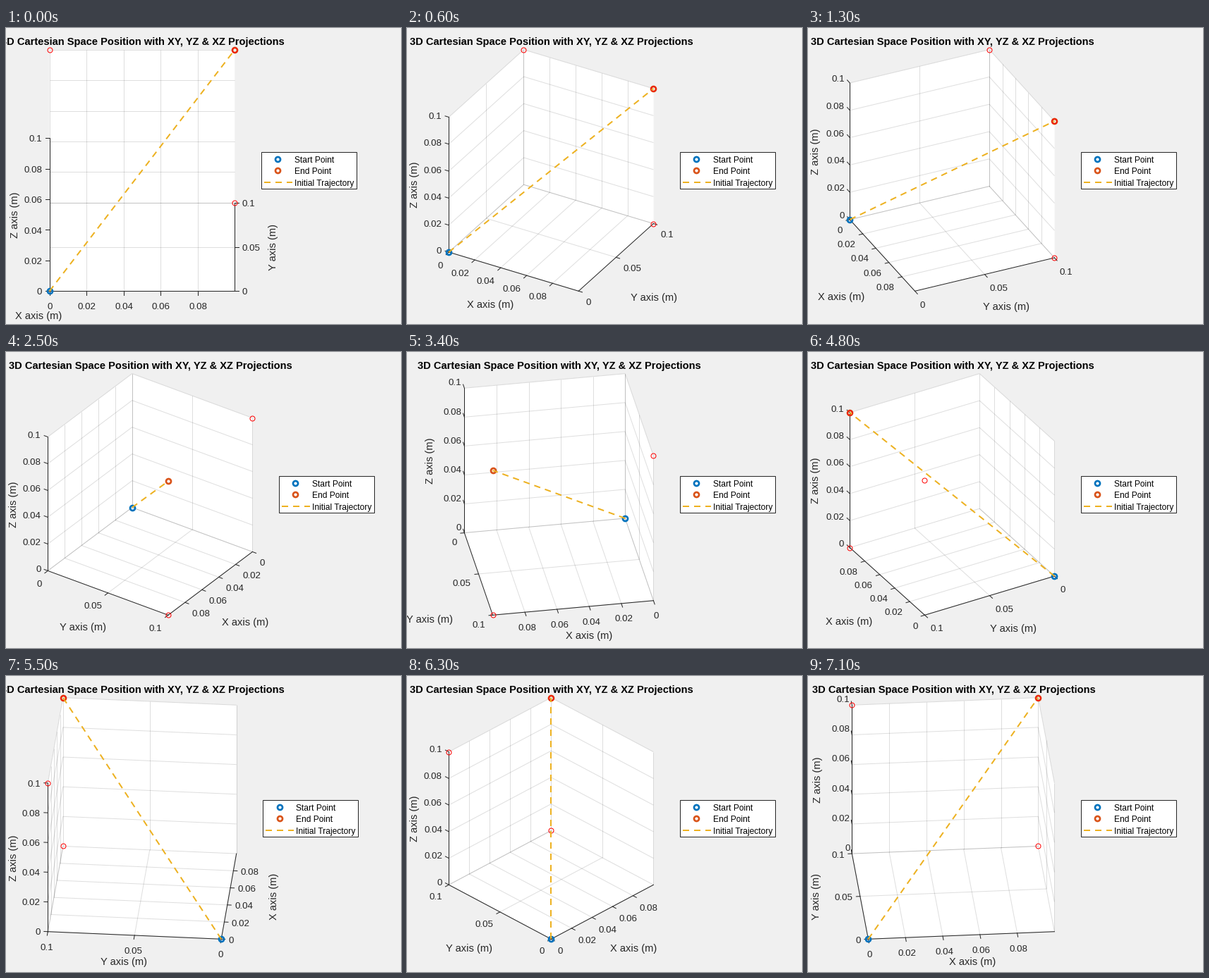
Recreate the animation shown at these times as a matplotlib script. Size 560 by 420 pixels, loop 7.2 s.

```python
import numpy as np
import matplotlib.pyplot as plt
from matplotlib.animation import FuncAnimation
from matplotlib.collections import LineCollection, PolyCollection

plt.rcParams["font.family"] = "Liberation Sans"

W, H, DPI = 560, 420, 100
PX = 72 / DPI                      # points per pixel
FRAMES, STEP, INTERVAL = 72, 5, 100
ELEV = np.radians(30)
TOP, BOTTOM, LEFT, RIGHT = 30.7, 373.3, 59.3, 349.4
ALIGNED_LEFT = 61.7
SAFE_LEFT, SAFE_RIGHT = 4, 385     # axis labels push the box inside these

INK = "#262626"
BLUE, ORANGE, YELLOW = "#0072bd", "#d95319", "#edb120"
DASH = (0, (4.5, 3.5))
X_TICKS = np.arange(5) / 5
Y_TICKS = np.array([0, 0.5, 1])
Z_TICKS = np.arange(6) / 5

# axis label offset against the tilt of its tick direction
TILT = [0, 10.7, 18.7, 42, 53, 62, 70, 76.6, 85]
TILT_DX = [10, 15.5, 23, 30, 36, 44, 50, 58, 70]
TILT_DY = [35, 36.5, 38, 44, 47, 50, 54, 58, 63]

fig = plt.figure(figsize=(W / DPI, H / DPI), dpi=DPI, facecolor="#f0f0f0")
ax = fig.add_axes([0, 0, 1, 1])


class View:
    """Unit cube seen from one azimuth, stretched to fill the plot box."""

    def __init__(self, deg, left, right):
        self.left, self.right = left, right
        self.deg = deg
        self.aligned = deg % 90 == 0
        a = np.radians(deg)
        c, s = np.cos(a), np.sin(a)
        self.mat = np.array([[c, s, 0],
                             [-np.sin(ELEV) * s, np.sin(ELEV) * c, np.cos(ELEV)]])
        self.low = np.minimum(self.mat, 0).sum(axis=1)
        self.span = np.abs(self.mat).sum(axis=1)
        self.depth = s - c
        # a tiny nudge settles which side faces the viewer when aligned
        n = a + 1e-4
        cpos, spos = np.cos(n) > 0, np.sin(n) > 0
        self.back = np.array([0 if spos else 1, 1 if cpos else 0])
        self.front = 1 - self.back
        self.corner = np.array([0 if cpos else 1, 0 if spos else 1])
        self.flat_x, self.flat_y = abs(s) < 1e-6, abs(c) < 1e-6

    def at(self, *p):
        u, v = (self.mat @ np.array(p, float) - self.low) / self.span
        return np.array([self.left + u * (self.right - self.left),
                         BOTTOM - v * (BOTTOM - TOP)])

    def direction(self, axis, sign):
        p = np.zeros(3)
        p[axis] = sign
        d = self.at(*p) - self.at(0, 0, 0)
        return d / np.hypot(*d)

    def x_axis(self, t):
        return self.at(t, self.front[1], 0)

    def y_axis(self, t):
        return self.at(self.front[0], t, 0)

    def z_axis(self, t):
        return self.at(*self.corner, t)

    def x_out(self):
        return self.direction(1, 2 * self.front[1] - 1)

    def y_out(self):
        return self.direction(0, 2 * self.front[0] - 1)

    def z_out(self):
        k = 0 if self.corner[0] == self.back[0] else 1
        return self.direction(k, 2 * self.corner[k] - 1)


def label_place(view, axis, out):
    """Centre of an axis label and whether it stands upright."""
    mid = axis(0.5)
    side = 1 if out[0] > 0 else -1
    tilt = np.degrees(np.arctan2(abs(out[0]), out[1]))
    if tilt > 86:
        return mid + [side * (53.6 if view.aligned else 63), 0], True
    if view.aligned:
        return np.array([view.left - 15.7, 408]), False
    return mid + [side * np.interp(tilt, TILT, TILT_DX),
                  np.interp(tilt, TILT, TILT_DY) + 0.6], False


def fit_view(deg):
    """Shrink the plot box where an axis label would stick out."""
    view = View(deg, LEFT, RIGHT)
    left, right = LEFT, RIGHT
    for axis, out in ((view.x_axis, view.x_out()), (view.y_axis, view.y_out())):
        (cx, _), upright = label_place(view, axis, out)
        half, gain = (7, 1) if upright else (33, 0.85)
        over_left = SAFE_LEFT - (cx - half)
        over_right = cx + half - SAFE_RIGHT
        if over_left > 2 and not view.aligned:
            left += gain * over_left
        if over_right > 2:
            right -= gain * over_right
    if view.aligned:
        left = ALIGNED_LEFT
    return View(deg, left, right)


def text(x, y, s, px, ha="center", color=INK, upright=False, **kw):
    """Text whose capitals are centred on the given point."""
    drop = 0.36 * px
    if upright:
        x += drop
    else:
        y += drop
    ax.text(x, y, s, fontsize=px * PX, ha=ha, va="baseline", color=color,
            rotation=90 if upright else 0, rotation_mode="anchor", **kw)


def line(p, q, color=INK, width=1, **kw):
    ax.plot([p[0], q[0]], [p[1], q[1]], color=color, lw=width * PX, **kw)


def dashed(p, q, z=5):
    line(p, q, YELLOW, 2, linestyle=DASH, zorder=z)


def ring(p, color, width=2.7, size=7, z=4):
    ax.plot(*p, "o", ms=size * PX, mew=width * PX, mec=color, mfc="none", zorder=z)


def draw_walls(v):
    bx, by = v.back
    square = [(0, 0), (1, 0), (1, 1), (0, 1)]
    quads = [[v.at(bx, a, b) for a, b in square],
             [v.at(a, by, b) for a, b in square],
             [v.at(a, b, 0) for a, b in square]]
    ax.add_collection(PolyCollection(quads, facecolors="white", edgecolors="white",
                                     linewidths=0.3, zorder=1))
    grid = [(v.at(t, 0, 0), v.at(t, 1, 0)) for t in X_TICKS]
    grid += [(v.at(0, t, 0), v.at(1, t, 0)) for t in Y_TICKS]
    if not v.flat_x:
        grid += [(v.at(bx, t, 0), v.at(bx, t, 1)) for t in Y_TICKS]
        grid += [(v.at(bx, 0, t), v.at(bx, 1, t)) for t in Z_TICKS]
    if not v.flat_y:
        grid += [(v.at(t, by, 0), v.at(t, by, 1)) for t in X_TICKS]
        grid += [(v.at(0, by, t), v.at(1, by, t)) for t in Z_TICKS]
    ax.add_collection(LineCollection(grid, colors=INK, alpha=0.15,
                                     linewidths=PX, zorder=2))


def draw_axis(axis, out, ticks, vertical=False):
    line(axis(0), axis(1), zorder=3)
    for t in ticks:
        p = axis(t)
        line(p, p + 5.5 * out, zorder=3)
        x, y = p + 9.5 * out
        if vertical:
            ha = "right"
        else:
            if abs(out[1]) > 0.06:
                y += 11.4
            ha = "center" if abs(out[0]) < 0.4 else "left" if out[0] > 0 else "right"
        x += {"left": 1, "right": -1, "center": 0.4}[ha]
        text(x, y + 0.4, f"{t / 10:g}", 13.33, ha)


def draw_legend(shift):
    x = 387 + shift
    ax.add_patch(plt.Rectangle((x, 176), 135, 52, fc="white", ec=INK,
                               lw=PX, zorder=6))
    rows = ((187, "Start Point"), (203, "End Point"), (219.5, "Initial Trajectory"))
    for y, name in rows:
        text(x + 47, y, name, 12, "left", "black", zorder=7)
    ring((x + 23.4, 185.5), BLUE, z=7)
    ring((x + 23.4, 202), ORANGE, z=7)
    dashed((x + 4, 219), (x + 44, 219), z=7)


def draw(i):
    ax.clear()
    ax.set(xlim=(0, W), ylim=(H, 0))
    ax.axis("off")
    v = fit_view(i * STEP)

    draw_walls(v)
    draw_axis(v.x_axis, v.x_out(), X_TICKS)
    draw_axis(v.y_axis, v.y_out(), Y_TICKS)
    draw_axis(v.z_axis, v.z_out(), Z_TICKS, vertical=True)

    for name, axis, out in (("X", v.x_axis, v.x_out()), ("Y", v.y_axis, v.y_out())):
        (x, y), upright = label_place(v, axis, out)
        text(x, y, f"{name} axis (m)", 14.67, upright=upright)
    zx, zy = v.z_axis(0.5)
    text(zx - 50, zy + 0.5, "Z axis (m)", 14.67, upright=True)

    start, end = v.at(0, 0, 0), v.at(1, 1, 1)
    ring(start, BLUE)
    ring(end, ORANGE)
    ring(end, "red", 1, z=4.5 if v.depth < 0.6 else 3.5)
    ring(v.at(0, 1, 1), "red", 1)
    ring(v.at(1, 1, 0), "red", 1)
    dashed(start, end)

    text((v.left + v.right) / 2 + 0.7, 19,
         "3D Cartesian Space Position with XY, YZ & XZ Projections",
         14.67, color="black", weight="bold")
    draw_legend(v.right - RIGHT)
    return []


anim = FuncAnimation(fig, draw, frames=FRAMES, interval=INTERVAL,
                     init_func=lambda: [], repeat=True, repeat_delay=0)
plt.show()
```
